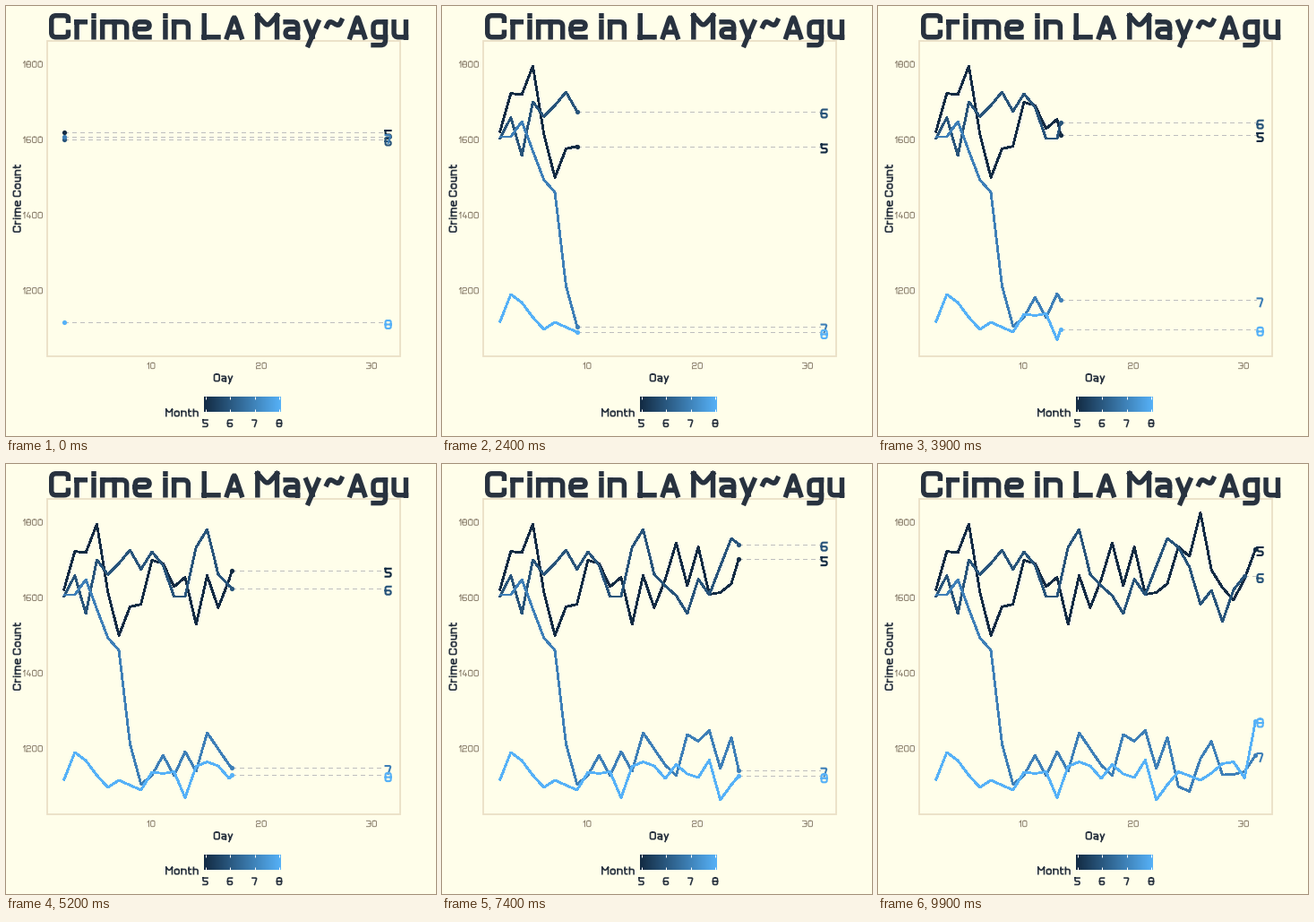
These frames come from a looping animation (480x480 px, 10000 ms). A matplotlib script:

```python
import numpy as np
import matplotlib.pyplot as plt
from matplotlib.animation import FuncAnimation
from matplotlib.patches import PathPatch, Rectangle
from matplotlib.path import Path
from matplotlib.transforms import Affine2D

SIZE, DPI = 480, 100
FRAMES, INTERVAL = 100, 100
PX = 72 / DPI

BG, INK, TAN, BORDER = "#fffeea", "#28323f", "#918674", "#eadfc6"
COLORS = {5: "#132b43", 6: "#28547a", 7: "#3e7fb7", 8: "#56b1f7"}

# Heights on the stage, one per day from day 2 on.
SERIES = {
    5: [141, 97.5, 99, 67, 143, 191.5, 159.5, 156.5, 107.5, 111,
        137, 126.5, 179, 124.5, 160.5, 129, 88, 136, 92.5, 145.5,
        143.5, 133.5, 92.5, 103, 54.5, 118.5, 138, 152, 128, 95],
    6: [148.5, 124.5, 167, 107, 123.5, 111, 96, 117.5, 98, 113,
        148, 148, 93, 73, 123, 136, 147, 167, 128.5, 146,
        114, 83, 93, 115, 156.5, 141, 176, 140.5, 125],
    7: [146, 146, 129, 162, 194, 208, 312, 357.5, 347.5, 325,
        348, 321, 343, 300, 318, 336, 348, 302, 309.5, 297.5,
        340, 305, 360, 365.5, 329, 309.5, 347, 346.5, 343.5, 325],
    8: [353, 322, 331, 347.5, 361, 353, 358.5, 364, 344, 345.5,
        343.5, 372.5, 337.5, 332.5, 337, 351, 335.5, 346, 350, 330.5,
        375, 358, 343.5, 348, 353, 345, 334.5, 332.5, 350.5, 286.5],
}
X0, STEP, X_END = 64.5, 12.31, 421.5

# Square stroke alphabet: each node is a column letter and a row letter.
GLYPHS = {
    "C": "re rt lt lb rb rk", "D": "lt rt rb lb lt", "L": "lt lb|lb rb",
    "A": "lb ct rb|qk sk", "M": "lb lt|lt cm rt|rt rb",
    "a": "lx rx rb|rb lb ln rn", "e": "rb lb lx rx rn ln",
    "g": "rb lb lx rx|rx rd ld", "h": "lt lb|lx rx rb", "i": "cx cb|ct cu",
    "m": "lb lx|lx rx rb|cx cb", "n": "lb lx|lx rx rb", "o": "lx rx rb lb lx",
    "r": "lb lx|lx rx", "t": "qt qb rb|lx rx", "u": "lx lb rb|rx rb",
    "y": "lx cb|rx qd", "~": "lm qe sm re",
    "0": "lt rt rb lb lt", "1": "le rt|rt rb", "2": "le lt rt rm lm lb|lb rb",
    "3": "lt rt rb lb|cm rm", "4": "ct lk rk|sm sb",
    "5": "rt lt|lt lm rm rb lb", "6": "rt lt lb rb rm lm",
    "7": "lt rt cb", "8": "lt rt rb lb lt|lm rm",
}
WIDTHS = {"C": .82, "D": .8, "L": .72, "A": .74, "M": .92, "e": .72, "h": .7,
          "i": .19, "m": 1.1, "n": .72, "o": .72, "r": .5, "t": .48,
          "~": .74, "1": .34}
GAP, SPACE, RADIUS = .14, .28, .17


def rounded(pts, verts, codes):
    """Append a polyline with softened corners."""
    pts = [np.array(p) for p in pts]
    if len(pts) > 2 and np.allclose(pts[0], pts[-1]):
        mid = (pts[0] + pts[1]) / 2
        pts = [mid] + pts[1:] + [mid]
    verts.append(pts[0])
    codes.append(Path.MOVETO)
    for a, b, c in zip(pts, pts[1:], pts[2:]):
        ends = []
        for other in (a, c):
            d = np.hypot(*(other - b))
            ends.append(b + (other - b) * min(RADIUS / d, .5))
        verts += [ends[0], b, ends[1]]
        codes += [Path.LINETO, Path.CURVE3, Path.CURVE3]
    verts.append(pts[-1])
    codes.append(Path.LINETO)


def text_path(s, weight):
    """Path of a line of text with cap height 1, and its width."""
    h = weight / 2
    rows = dict(t=h - 1, u=h - .98, e=-.72, x=h - .76, m=-.5, n=-.4,
                k=-.28, b=-h, d=.3 - h)
    verts, codes, pen = [], [], 0
    for ch in s:
        if ch == " ":
            pen += SPACE
            continue
        w = WIDTHS.get(ch, .74 if ch.isdigit() else .64)
        cols = dict(l=h, q=.27 * w, c=w / 2, s=.73 * w, r=w - h)
        for stroke in GLYPHS[ch].split("|"):
            pts = [(pen + cols[c], rows[r]) for c, r in stroke.split()]
            rounded(pts, verts, codes)
        pen += w + GAP
    return Path(verts, codes), pen - GAP


fig = plt.figure(figsize=(SIZE / DPI, SIZE / DPI), dpi=DPI, facecolor=BG)
ax = fig.add_axes([0, 0, 1, 1])
ax.set_xlim(0, SIZE)
ax.set_ylim(SIZE, 0)
ax.axis("off")


def text(s, x, base, cap, weight, color, anchor=.5, angle=0, z=5):
    path, width = text_path(s, weight)
    place = (Affine2D().translate(-anchor * width, 0).scale(cap)
             .rotate_deg(angle).translate(x, base))
    patch = PathPatch(place.transform_path(path), fill=False, ec=color,
                      lw=weight * cap * PX, capstyle="projecting",
                      joinstyle="miter", zorder=z)
    return ax.add_patch(patch)


# Panel, titles and axes
ax.add_patch(Rectangle((46, 38.5), 394, 352.5, fill=False, ec=BORDER,
                       lw=1.8 * PX, zorder=1))
text("Crime in LA May~Agu", 48, 37.5, 29.5, .185, INK, anchor=0)
text("Crime Count", 16.7, 215, 9.2, .18, INK, angle=-90)
text("Day", 242.5, 419.5, 9.2, .18, INK)
for i in range(4):
    text(str(1800 - 200 * i), 41, 68.8 + 84.2 * i, 7.4, .14, TAN, anchor=1)
for i in range(3):
    text(str(10 + 10 * i), 162 + 123 * i, 405.2, 7.4, .14, TAN)

# Colour bar
text("Month", 178, 458.5, 9, .18, INK, anchor=0)
lo, hi = (np.array([int(COLORS[m][i:i + 2], 16) for i in (1, 3, 5)]) / 255
          for m in (5, 8))
ramp = lo + (hi - lo) * np.linspace(0, 1, 86)[:, None]
ax.imshow(ramp[None], extent=(221, 307, 453, 436), aspect="auto",
          interpolation="nearest", zorder=2)
ax.set_xlim(0, SIZE)
ax.set_ylim(SIZE, 0)
for i, month in enumerate(COLORS):
    x = 222.5 + 27.5 * i
    for top in (436, 449.6):
        ax.plot([x, x], [top, top + 3.4], color="white", lw=PX,
                solid_capstyle="butt", zorder=3)
    text(str(month), x, 470.3, 9, .18, INK)


class Track:
    """One month's line, guide, dot and label."""

    def __init__(self, month, ys):
        color = COLORS[month]
        self.ys = np.array(ys, float)
        days = np.arange(len(ys))
        self.xs = X0 + STEP * days
        self.keys = np.round(days * (FRAMES - 1) / 29)
        z = month / 100
        self.line, = ax.plot([], [], color=color, lw=1.75 * PX, zorder=2 + z,
                             antialiased=False, solid_joinstyle="round",
                             solid_capstyle="butt")
        self.guide, = ax.plot([], [], color="#bebebe", lw=1.07 * PX,
                              zorder=3, antialiased=False,
                              dash_capstyle="butt", dashes=(4, 4))
        self.dot, = ax.plot([], [], "o", color=color, ms=5.2 * PX, mew=0,
                            zorder=4 + z)
        self.label = text(str(month), 426.6, 8, 11, .19, color, z=6 + z)

    def show(self, frame):
        x = np.interp(frame, self.keys, self.xs)
        y = np.interp(frame, self.keys, self.ys)
        past = self.keys < frame
        self.line.set_data(np.append(self.xs[past], x),
                           np.append(self.ys[past], y))
        self.guide.set_data([x, X_END], [y, y])
        self.dot.set_data([x], [y])
        self.label.set_transform(Affine2D().translate(0, y) + ax.transData)


tracks = [Track(month, ys) for month, ys in SERIES.items()]


def update(frame):
    for track in tracks:
        track.show(frame)
    return []


anim = FuncAnimation(fig, update, frames=FRAMES, interval=INTERVAL,
                     init_func=lambda: [], repeat=True, repeat_delay=0)
plt.show()
```
